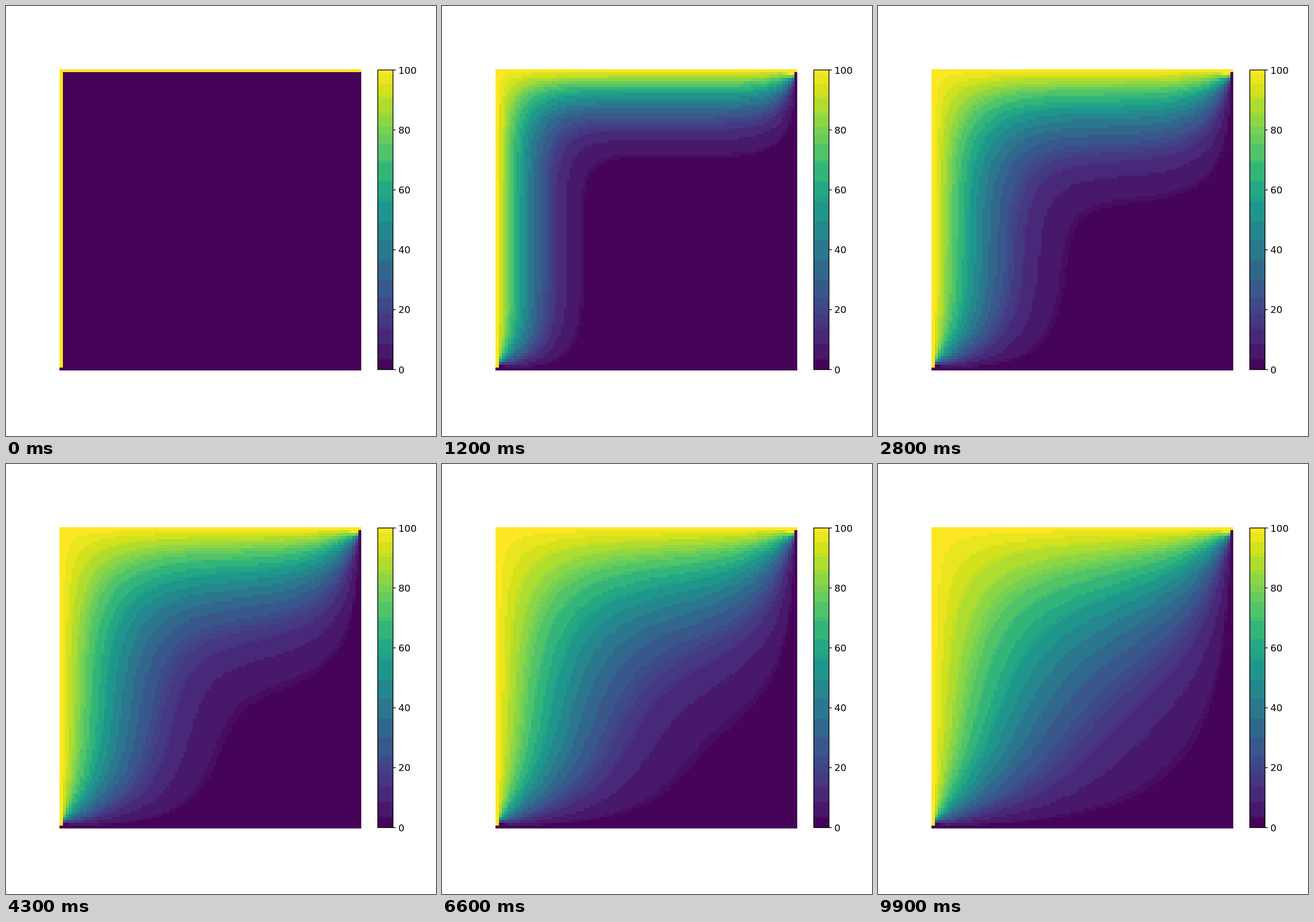
Write an HTML page with a canvas that moves like this. It is 748 px wide and 748 px high and loops after 10000 ms.

```html
<!DOCTYPE html>
<html lang="en">
<head>
<meta charset="utf-8">
<title>Heat diffusion</title>
<style>
html, body { margin: 0; width: 100%; height: 100%; overflow: hidden; background: #fff; }
canvas { display: block; }
</style>
</head>
<body>
<canvas id="stage" width="748" height="748"></canvas>
<script>
const ctx = document.getElementById('stage').getContext('2d');

// Viridis, reduced to a small set of flat bands.
const viridis = ('440154 481567 482677 453781 404788 39568c 33638d 2d708e 287d8e 238a8d ' +
  '1f968b 20a387 29af7f 3cbb75 55c667 73d055 95d840 b8de29 dce319 fde725').split(' ')
  .map(hex => [0, 2, 4].map(i => parseInt(hex.slice(i, i + 2), 16)));
const levels = [0, 3.1, 3.8, 8.5, 13.6, 14.8, 18.4, 20.9, 24, 30, 36.3, 43, 49.5, 56, 57.6,
  62.8, 69, 70.2, 75.4, 78.5, 81, 84.6, 85.8, 90.2, 91.7, 95.2, 98.5, 100];

function viridisAt(value) {
  const p = value / 100 * 19, i = Math.min(18, Math.floor(p)), f = p - i;
  return `rgb(${viridis[i].map((c, k) => Math.round(c + (viridis[i + 1][k] - c) * f))})`;
}
const last = levels.length - 2;
const colors = levels.slice(0, -1).map((low, i) =>
  viridisAt(i === 0 ? 0.8 : i === last ? 100 : (low + levels[i + 1]) / 2));

function bandOf(value) {
  let i = last;
  while (i > 0 && value < levels[i]) i--;
  return i;
}

// Alternating-direction implicit diffusion on an N x N plate.
const N = 102, M = N - 1, C = 3.9, FRAMES = 100;
const at = (row, col) => row * N + col;

// Solves (1 - C d2) x = rhs with both end values fixed.
function solveLine(rhs) {
  const up = new Float64Array(N), x = Float64Array.from(rhs);
  for (let i = 1; i < M; i++) {
    const m = 1 + 2 * C - C * up[i - 1];
    up[i] = C / m;
    x[i] = (rhs[i] + C * x[i - 1]) / m;
  }
  for (let i = M - 1; i > 0; i--) x[i] += up[i] * x[i + 1];
  return x;
}

const explicit = (u, p, stride) => u[p] + C * (u[p - stride] - 2 * u[p] + u[p + stride]);

function step(u) {
  const half = u.slice(), next = u.slice(), line = new Float64Array(N);
  for (let r = 1; r < M; r++) {
    for (let c = 0; c < N; c++) line[c] = explicit(u, at(r, c), N);
    half.set(solveLine(line), at(r, 0));
  }
  for (let c = 1; c < M; c++) {
    line[0] = u[at(0, c)];
    line[M] = u[at(M, c)];
    for (let r = 1; r < M; r++) line[r] = explicit(half, at(r, c), 1);
    const x = solveLine(line);
    for (let r = 1; r < M; r++) next[at(r, c)] = x[r];
  }
  return next;
}

let plate = new Float64Array(N * N);
for (let i = 0; i < N; i++) plate[at(0, i)] = 100;
for (let i = 0; i < M; i++) plate[at(i, 0)] = 100;
const frames = [];
for (let n = 0; n < FRAMES; n++) {
  frames.push(Uint8Array.from(plate, bandOf));
  plate = step(plate);
}

const edge = (start, i) => Math.round(start + i * 5.141);

function drawPlate(bands) {
  for (let r = 0; r < N; r++) {
    const y = edge(110, r), h = edge(110, r + 1) - y;
    for (let c = 0, end; c < N; c = end) {
      const band = bands[at(r, c)];
      for (end = c + 1; end < N && bands[at(r, end)] === band;) end++;
      const x = edge(93.4, c);
      ctx.fillStyle = colors[band];
      ctx.fillRect(x, y, edge(93.4, end) - x, h);
    }
  }
}

function drawScale() {
  const yOf = value => 632.5 - value * 5.212;
  colors.forEach((color, i) => {
    const top = Math.round(yOf(levels[i + 1]));
    ctx.fillStyle = color;
    ctx.fillRect(647, top, 26, Math.round(yOf(levels[i])) - top);
  });
  ctx.strokeStyle = ctx.fillStyle = '#000';
  ctx.lineWidth = 1.3;
  ctx.strokeRect(646.7, 111.3, 26.5, 521.2);
  ctx.font = '16.7px "DejaVu Sans", sans-serif';
  for (let value = 0; value <= 100; value += 20) {
    const y = yOf(value);
    ctx.beginPath();
    ctx.moveTo(673, y);
    ctx.lineTo(678, y);
    ctx.stroke();
    ctx.fillText(value, 682.4, y + 6.2);
  }
}

ctx.fillStyle = '#fff';
ctx.fillRect(0, 0, 748, 748);
drawScale();

const start = performance.now();
let shown = -1;
function tick() {
  const n = Math.floor((performance.now() - start) / 100) % FRAMES;
  if (n !== shown) drawPlate(frames[shown = n]);
  requestAnimationFrame(tick);
}
tick();
</script>
</body>
</html>
```
